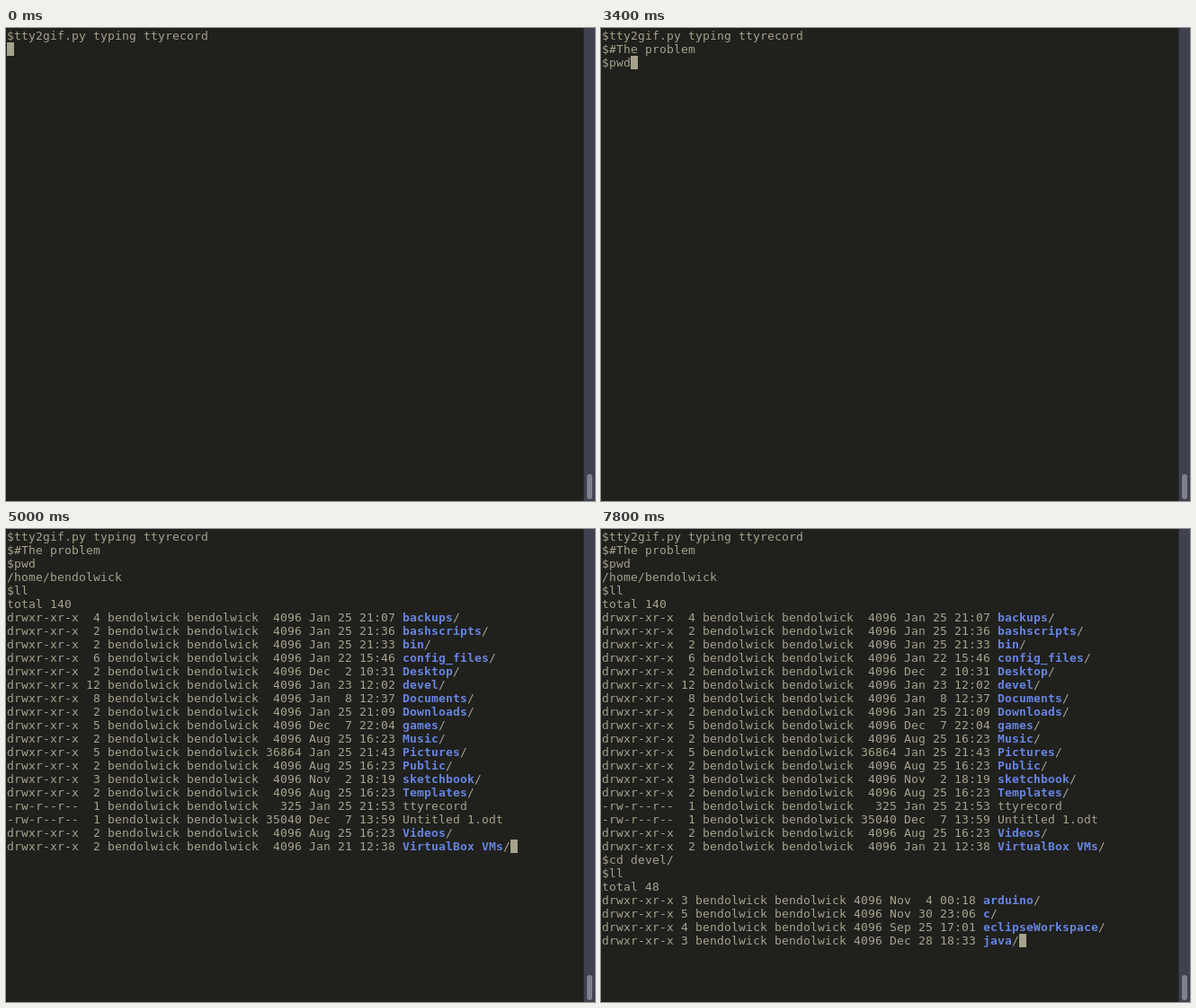
Animation of 655 by 527 pixels, one loop 8000 ms. Source, as an HTML page with a canvas:

```html
<!DOCTYPE html>
<html lang="en">
<head>
<meta charset="utf-8">
<title>Terminal session</title>
<style>
  html, body { margin: 0; width: 100%; height: 100%; overflow: hidden; background: #20201d; }
  canvas { display: block; }
</style>
</head>
<body>
<canvas id="stage" width="655" height="527"></canvas>
<script>
const ctx = document.getElementById('stage').getContext('2d');
const LOOP = 8000, CELL_W = 8, CELL_H = 15, ORIGIN = 1, ASCENT = 12;
const BG = '#20201d', FG = '#a6a28c', BLUE = '#6684e1';
const FONT = '13px "DejaVu Sans Mono", monospace';
const USER = 'bendolwick';

// Expands "links size month day time name" lines into long directory listings.
const listing = (linkWidth, sizeWidth, text) => text.trim().split('\n').map(line => {
  const [links, size, month, day, time, ...name] = line.trim().split(/ +/);
  const file = name.join(' ');
  const mode = file.endsWith('/') ? 'drwxr-xr-x' : '-rw-r--r--';
  return [mode, links.padStart(linkWidth), USER, USER, size.padStart(sizeWidth),
    month, day.padStart(2), time, file].join(' ');
});

const home = listing(2, 5, `
  4 4096 Jan 25 21:07 backups/
  2 4096 Jan 25 21:36 bashscripts/
  2 4096 Jan 25 21:33 bin/
  6 4096 Jan 22 15:46 config_files/
  2 4096 Dec 2 10:31 Desktop/
  12 4096 Jan 23 12:02 devel/
  8 4096 Jan 8 12:37 Documents/
  2 4096 Jan 25 21:09 Downloads/
  5 4096 Dec 7 22:04 games/
  2 4096 Aug 25 16:23 Music/
  5 36864 Jan 25 21:43 Pictures/
  2 4096 Aug 25 16:23 Public/
  3 4096 Nov 2 18:19 sketchbook/
  2 4096 Aug 25 16:23 Templates/
  1 325 Jan 25 21:53 ttyrecord
  1 35040 Dec 7 13:59 Untitled 1.odt
  2 4096 Aug 25 16:23 Videos/
  2 4096 Jan 21 12:38 VirtualBox VMs/`);

const devel = listing(1, 4, `
  3 4096 Nov 4 00:18 arduino/
  5 4096 Nov 30 23:06 c/
  4 4096 Sep 25 17:01 eclipseWorkspace/
  3 4096 Dec 28 18:33 java/`);

const rows = (list, from, to) => list.slice(from, to).join('\n');

// Terminal output: [time in ms, text appended]
const output = [
  [0, '$tty2gif.py typing ttyrecord\n'],
  [400, '$'], [600, '#'], [800, 'T'], [1000, 'he'],
  ...[...' probl'].map((c, i) => [1400 + i * 200, c]),
  [2600, 'em'],
  [3000, '\n$'], [3200, 'p'], [3400, 'wd'],
  [3800, `\n/home/${USER}\n$`],
  [4200, 'll'],
  [4600, '\ntotal 140\n' + rows(home, 0, 8)],
  [4800, '\n' + rows(home, 8, 14)],
  [5000, '\n' + rows(home, 14)],
  [5200, '\n'], [5400, '$'], [5600, 'c'], [5800, 'd'],
  [6000, ' '], [6200, 'de'], [6400, 'vel/'],
  [6600, '\n'], [6800, '$'], [7000, 'l'], [7200, 'l'],
  [7400, '\n'], [7600, 'total 48\n'], [7800, rows(devel, 0)]
];

function drawLine(line, row) {
  const dir = line.match(/^(d.*\d\d:\d\d )(.+)\/$/);
  const start = dir ? dir[1].length : Infinity;
  [...line].forEach((char, col) => {
    const inName = col >= start && col < line.length - 1;
    ctx.font = inName ? 'bold ' + FONT : FONT;
    ctx.fillStyle = inName ? BLUE : FG;
    ctx.fillText(char, ORIGIN + col * CELL_W, ORIGIN + row * CELL_H + ASCENT);
  });
}

function drawScrollbar() {
  ctx.fillStyle = '#2e2f37';
  ctx.fillRect(642, 0, 1, 527);
  ctx.fillStyle = '#3f414e';
  ctx.fillRect(643, 0, 12, 527);
  ctx.fillStyle = '#7f818b';
  ctx.beginPath();
  ctx.roundRect(646, 497, 6, 28, 3);
  ctx.fill();
}

function frame() {
  const t = performance.now() % LOOP;
  const lines = output.filter(([at]) => at <= t).map(([, text]) => text).join('').split('\n');
  const last = lines.length - 1;
  ctx.fillStyle = BG;
  ctx.fillRect(0, 0, 655, 527);
  lines.forEach(drawLine);
  ctx.fillStyle = FG;
  ctx.fillRect(ORIGIN + lines[last].length * CELL_W, ORIGIN + last * CELL_H, CELL_W, CELL_H);
  drawScrollbar();
  requestAnimationFrame(frame);
}
frame();
</script>
</body>
</html>
```
